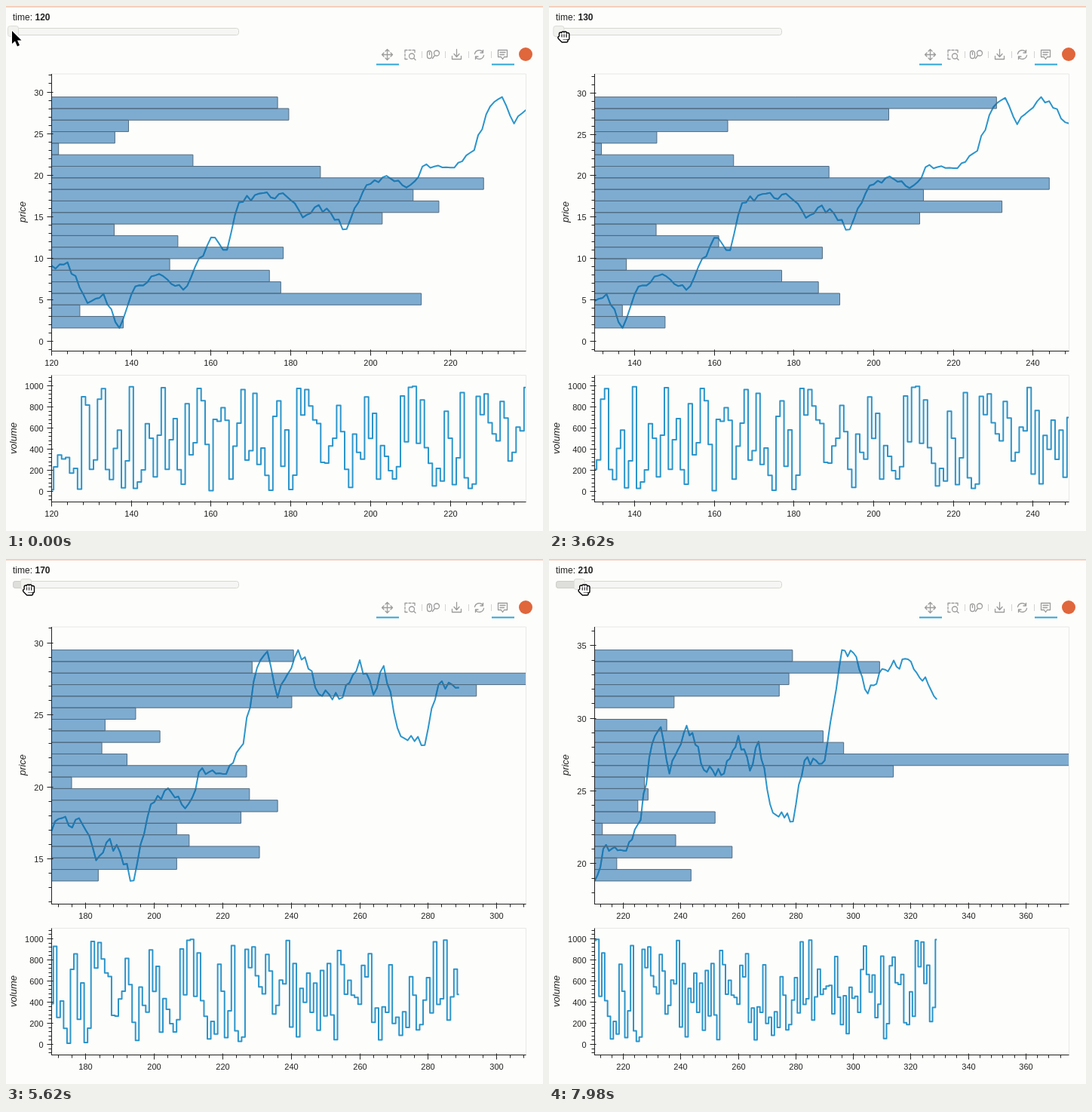
An HTML page with a canvas for the animation above (8 s loop, 712 by 696 pixels).

```html
<!DOCTYPE html>
<html lang="en">
<head>
<meta charset="utf-8">
<title>Volume profile</title>
<style>
  html, body { margin: 0; width: 100%; height: 100%; overflow: hidden; background: #fdfdfb; }
  canvas { display: block; }
</style>
</head>
<body>
<canvas id="stage" width="712" height="696"></canvas>
<script>
const ctx = document.getElementById('stage').getContext('2d');
const LOOP = 8000, START = 120, SPAN = 120, TOTAL = 210, BINS = 20;
const LEFT = 60.5, RIGHT = 689.5, PX_PER_UNIT = 300 / 880;
const FONT = '"Liberation Sans", Arial, sans-serif';
const BG = '#fdfdfb', INK = '#222', ACCENT = '#2fa4d6';
const LINE = '#2c95cb', LINE_ON_BAR = '#1f79b2', BAR = '#7eacd1', BAR_EDGE = '#516a7e';

function randomFrom(seed) {
  return () => (seed = seed * 16807 % 2147483647) / 2147483647;
}

// Turning points of the price: [time, value]
const turns = [
  [120, 9.1], [124, 9.5], [129, 4.6], [133, 5.7], [137, 1.6], [141, 6.6], [147, 8.1],
  [153, 6.2], [160, 12.5], [164, 11], [167, 16.7], [171, 17.6], [179, 17.4], [183, 14.9],
  [187, 16.4], [194, 13.5], [199, 18.8], [205, 19.6], [209, 18.5], [214, 21.3], [220, 20.9],
  [226, 23], [229, 27.3], [233, 29.4], [236, 26.2], [242, 29.5], [249, 26.3], [255, 26.2],
  [260, 28.8], [264, 26.4], [267, 28.4], [271, 24.1], [279, 22.9], [283, 27.1], [290, 27.1],
  [296, 34.7], [300, 34.5], [305, 31.7], [310, 33.4], [320, 33.9], [329, 31.3]
];

// Straight runs between the turns, roughened a little.
function buildPrice() {
  const random = randomFrom(11), values = [turns[0][1]];
  turns.slice(1).forEach(([t, p], i) => {
    const [t0, p0] = turns[i];
    for (let s = t0 + 1; s < t; s++) {
      values.push(p0 + (p - p0) * (s - t0) / (t - t0) + (random() - .5) * .9);
    }
    values.push(p);
  });
  return values;
}

const price = buildPrice();
const randomVolume = randomFrom(2024);
const volume = Array.from({ length: TOTAL }, () => randomVolume() * 1000);

function padded(lo, hi) {
  const pad = (hi - lo) / 10;
  return { lo, hi, from: lo - pad, to: hi + pad };
}

// Each bar is its price band's share of the window's volume, in thousandths.
function buildView(time) {
  const first = time - START;
  const prices = price.slice(first, first + SPAN);
  const volumes = volume.slice(first, first + SPAN);
  const priceRange = padded(Math.min(...prices), Math.max(...prices));
  const size = (priceRange.hi - priceRange.lo) / BINS;
  const sum = volumes.reduce((a, b) => a + b, 0);
  const bins = Array(BINS).fill(0);
  prices.forEach((p, i) => {
    bins[Math.min(BINS - 1, Math.floor((p - priceRange.lo) / size))] += volumes[i] / sum * 1000;
  });
  const end = time + Math.max(SPAN - 1, ...bins);
  return { time, prices, volumes, priceRange, volumeRange: padded(0, 1000), size, bins, end };
}

const views = new Map();
function viewAt(time) {
  if (!views.has(time)) views.set(time, buildView(time));
  return views.get(time);
}

// The drag begins slowly and gathers speed; the slider snaps to tens.
const DRAG_START = 2400;
function dragDistance(ms) {
  const s = Math.max(0, ms - DRAG_START) / 1000;
  return 3.63 * s + .383 * s * s;
}
function sliderValue(ms) {
  return START + 10 * Math.round(dragDistance(ms) / PX_PER_UNIT / 10);
}

function stroke(color, width, path) {
  ctx.strokeStyle = color;
  ctx.lineWidth = width;
  path ? ctx.stroke(path) : ctx.stroke();
}

function segment(x1, y1, x2, y2, color = INK, width = 1) {
  ctx.beginPath();
  ctx.moveTo(x1, y1);
  ctx.lineTo(x2, y2);
  stroke(color, width);
}

function label(text, x, y, align = 'center', font = '11px') {
  ctx.font = `${font} ${FONT}`;
  ctx.textAlign = align;
  ctx.textBaseline = 'alphabetic';
  ctx.fillStyle = INK;
  ctx.fillText(text, x, y);
}

function sideLabel(text, x, y) {
  ctx.save();
  ctx.translate(x, y);
  ctx.rotate(-Math.PI / 2);
  label(text, 0, 4, 'center', 'italic 13px');
  ctx.restore();
}

function ticks(from, to, major, draw) {
  const minor = major / 5;
  for (let n = Math.ceil(from / minor - 1e-9); n * minor <= to + 1e-9; n++) {
    draw(n * minor, n % 5 === 0);
  }
}

const crisp = v => Math.round(v - .5) + .5;

function axes(view, range, top, bottom, step, x, y) {
  ctx.strokeStyle = '#e8e8e8';
  ctx.lineWidth = 1;
  ctx.strokeRect(LEFT, top, RIGHT - LEFT, bottom - top);
  segment(LEFT, top, LEFT, bottom + .5);
  segment(LEFT, bottom, RIGHT, bottom);
  ticks(view.time, view.end, 20, (v, isMajor) => {
    const px = crisp(x(v));
    segment(px, bottom - (isMajor ? 2 : 0), px, bottom + (isMajor ? 6 : 4));
    if (isMajor) label(v, px, bottom + 19);
  });
  ticks(range.from, range.to, step, (v, isMajor) => {
    const py = crisp(y(v));
    segment(LEFT - (isMajor ? 6 : 4), py, LEFT + (isMajor ? 2 : 0), py);
    if (isMajor) label(Math.round(v), 49.5, py + 4, 'right');
  });
}

function clipPlot(top, bottom, draw) {
  ctx.save();
  ctx.beginPath();
  ctx.rect(LEFT, top, RIGHT - LEFT, bottom - top);
  ctx.clip();
  draw();
  ctx.restore();
}

function charts(view) {
  const { time, prices, volumes, priceRange, volumeRange, size, bins, end } = view;
  const scaleY = (r, top, bottom) => v => bottom - (v - r.from) / (r.to - r.from) * (bottom - top);
  const x = v => LEFT + (v - time) / (end - time) * (RIGHT - LEFT);
  const yp = scaleY(priceRange, 90, 457.5), yv = scaleY(volumeRange, 489.5, 657.5);
  ctx.lineJoin = 'round';

  clipPlot(90, 457.5, () => {
    const bars = new Path2D(), curve = new Path2D();
    bins.forEach((b, i) => {
      const low = priceRange.lo + i * size, top = yp(low + size);
      if (b > 0) bars.rect(LEFT, top, x(time + b) - LEFT, yp(low) - top);
    });
    prices.forEach((p, i) => curve.lineTo(x(time + i), yp(p)));
    ctx.fillStyle = BAR;
    ctx.fill(bars);
    stroke(LINE, 2, curve);
    ctx.save();
    ctx.clip(bars);
    stroke(LINE_ON_BAR, 2, curve);
    ctx.restore();
    stroke(BAR_EDGE, 1, bars);
  });

  clipPlot(489.5, 657.5, () => {
    ctx.beginPath();
    volumes.forEach((v, i) => {
      ctx.lineTo(x(time + Math.max(0, i - .5)), yv(v));
      ctx.lineTo(x(time + Math.min(SPAN - 1, i + .5)), yv(v));
    });
    stroke(LINE, 2);
  });

  axes(view, priceRange, 90, 457.5, 5, x, yp);
  axes(view, volumeRange, 489.5, 657.5, 200, x, yv);
  sideLabel('price', 22, 273);
  sideLabel('volume', 10, 573);
}

function roundBox(x, y, w, h, fill, edge) {
  ctx.beginPath();
  ctx.roundRect(x, y, w, h, 3);
  ctx.fillStyle = fill;
  ctx.fill();
  stroke(edge, 1);
}

function slider(time) {
  const knob = 9 + (time - START) * PX_PER_UNIT;
  segment(0, 1, 712, 1, '#f3c0a8', 1.5);
  label('time: ', 9, 19, 'left', '12px');
  label(time, 38.5, 19, 'left', 'bold 12px');
  roundBox(9.5, 29.5, 299, 9, '#f6f6f4', '#d6d6d2');
  if (time > START) roundBox(9.5, 29.5, knob - 9, 9, '#dededa', '#cdcdc9');
  roundBox(knob - 6.5, 26.5, 14, 14, '#f1f1ee', '#dcdcd8');
}

const icons = [
  [505.5, 'M-7 0H7M0-7V7M-2.5-4.5L0-7L2.5-4.5M-2.5 4.5L0 7L2.5 4.5M-4.5-2.5L-7 0L-4.5 2.5M4.5-2.5L7 0L4.5 2.5'],
  [536, 'M-7-3V-6H-4M-2-6H1M3-6H6V-3M-7-1V2M-7 4V6H-4M7 7L4.5 4.5M5.5 2a3.5 3.5 0 1 1-7 0a3.5 3.5 0 1 1 7 0'],
  [566.5, 'M-5-5a3 3 0 0 1 3 3V2a3 3 0 0 1-6 0V-2a3 3 0 0 1 3-3M-5-3V0M8-2a3.5 3.5 0 1 1-7 0a3.5 3.5 0 1 1 7 0M2 1L-1 5'],
  [597.5, 'M0-7V3M-3.5-1L0 3L3.5-1M-6 2V6H6V2'],
  [627.5, 'M-6-1A6 6 0 0 1 5-3M5-6V-2.5H1.5M6 1A6 6 0 0 1-5 3M-5 6V2.5H-1.5'],
  [658.5, 'M-6-6H6V3H2L0 6L-2 3H-6ZM-3.5-3H3.5M-3.5 0H2']
].map(([x, d]) => [x, new Path2D(d)]);

function toolbar() {
  ctx.lineCap = 'round';
  for (const [x, shape] of icons) {
    ctx.save();
    ctx.translate(x, 64.5);
    stroke('#9c9c9c', 1.3, shape);
    ctx.restore();
  }
  ctx.lineCap = 'butt';
  for (const x of [551.5, 582.5, 613.5, 643.5]) segment(x, 60, x, 69, '#d4d4d4');
  for (const x of [491, 644]) segment(x, 77.5, x + 30, 77.5, ACCENT, 2);
  ctx.beginPath();
  ctx.arc(689, 64, 9, 0, 7);
  ctx.fillStyle = '#e0663c';
  ctx.fill();
}

const arrow = new Path2D('M0 0V17L4 13.5L7 20.5L10 19L7 12.5H12.5Z');
const openHand = new Path2D('M-6-2L-4 4M-3.5-6.5L-2 2M0-8V2M3.5-6.5L2.5 2M6.5-3L5 4M-3 3H4M-2 6H3M-6.5 2L-2 7');
const closedHand = new Path2D('M-4.5-4V2M-1.5-5V2M1.5-5V2M4.8-3.5V2M-6 1L-2 5M-3 2H4M-2 5H3');

function pointer(ms) {
  ctx.save();
  ctx.lineJoin = ctx.lineCap = 'round';
  if (ms < 840) {
    ctx.translate(8, 33);
    stroke('#fff', 2.4, arrow);
    ctx.fillStyle = '#000';
    ctx.fill(arrow);
  } else {
    const dragging = ms >= DRAG_START, distance = dragDistance(ms);
    const hand = dragging ? closedHand : openHand;
    ctx.translate(15 + distance, 38 + Math.min(3, distance));
    stroke('#000', 5.4, hand);
    stroke('#fff', 2.7, hand);
    if (dragging) for (const x of [-3, 0, 3]) segment(x, -3, x, 0, '#000', .9);
  }
  ctx.restore();
}

const origin = performance.now();
function frame(now) {
  const ms = Math.max(0, now - origin) % LOOP;
  const time = sliderValue(ms);
  ctx.fillStyle = BG;
  ctx.fillRect(0, 0, 712, 696);
  charts(viewAt(time));
  slider(time);
  toolbar();
  pointer(ms);
  requestAnimationFrame(frame);
}
frame(origin);
</script>
</body>
</html>
```
